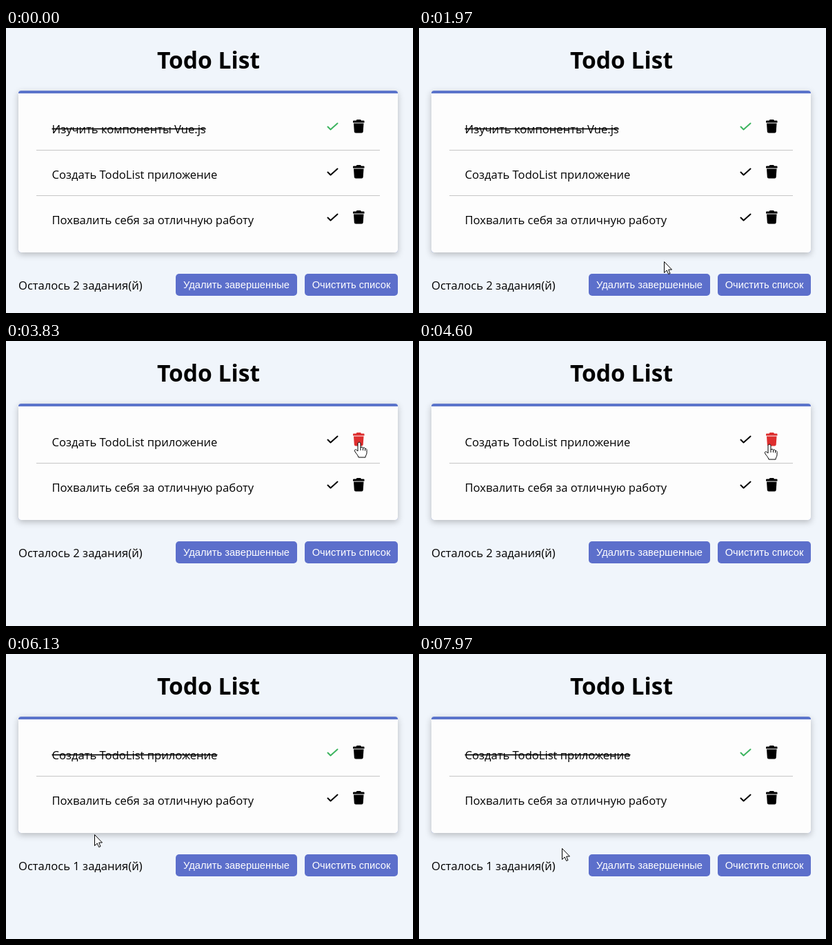
These frames come from a looping animation (590 px wide and 414 px high, 8000 ms). An HTML page:

```html
<!DOCTYPE html>
<html lang="ru">
<head>
<meta charset="utf-8">
<title>Todo List</title>
<style>
  html, body { margin: 0; width: 100%; height: 100%; overflow: hidden; background: #f0f5fb; }
  svg { display: block; }
  text { font: 16.6px "Open Sans", "Noto Sans", sans-serif; }
  .title { font-size: 33.6px; font-weight: 700; text-anchor: middle; }
  .button { font: 14.7px "Liberation Sans", Arial, sans-serif; fill: #fff; text-anchor: middle; }
  .check { fill: none; stroke-width: 2; stroke-linecap: round; stroke-linejoin: round; }
  .card { filter: drop-shadow(0 3px 5px rgba(0, 0, 0, .24)); }
  .pointer { fill: #fff; stroke: #000; stroke-linejoin: round; }
</style>
</head>
<body>
<svg width="590" height="414" viewBox="0 0 590 414">
  <text class="title" x="293.5" y="59">Todo List</text>
  <g class="card">
    <rect id="edge" x="18" y="91" width="550" rx="4" fill="#5b74cb"/>
    <path id="sheet" fill="#fdfdfd"/>
  </g>
  <g id="rows"></g>
  <g id="footer">
    <text id="left" x="18" y="380"></text>
    <g fill="#5c6fcb">
      <rect x="246" y="357" width="176" height="32" rx="5"/>
      <rect x="433" y="357" width="135" height="32" rx="5"/>
    </g>
    <text class="button" x="334" y="378">Удалить завершенные</text>
    <text class="button" x="500.5" y="378">Очистить список</text>
  </g>
  <g id="cursor" class="pointer">
    <path id="arrow" d="M.5 .5V16.5L4.2 13 6.7 18.5 9 17.5 6.7 12H11.5Z"/>
    <g id="hand">
      <path d="M-2 2C-2 -.5 2 -.5 2 2V8C3 6.5 5.5 7 5.5 8.5C7 7.5 8.5 8 8.5 9.5C10 9 11 10 11 11.5V15.5C11 18 9 19.5 9 22H-1C-1.5 19 -5 16 -6.5 13C-7.5 11 -5 10 -3.5 11.5L-2 13Z"/>
      <path fill="none" d="M2 8V12M5.5 8.5V12M8.5 9.5V12.5"/>
    </g>
  </g>
</svg>
<script>
const LOOP = 8000, DELETE_AT = 3830, FINISH_AT = 5400, STEP = 66;
const GREEN = '#3cb45f', RED = '#dd2e2e';
const tasks = ['Изучить компоненты Vue.js', 'Создать TodoList приложение', 'Похвалить себя за отличную работу'];

// Pointer moves: start, end, destination x, y
const moves = [
  [70, 300, 340, 335],
  [870, 1230, 143, 74],
  [1230, 1670, 90, 345],
  [1700, 2200, 560, 335],
  [2200, 2500, 545, 150],
  [2530, 2770, 512, 147],
  [4230, 4370, 508, 150],
  [4600, 5130, 478, 146],
  [5400, 6130, 128, 262],
  [6230, 6500, 20, 320],
  [6500, 7030, 550, 345],
  [7070, 7300, 20, 300],
  [7300, 7530, 545, 282],
  [7800, 7970, 207, 282]
];

const $ = id => document.getElementById(id);
const fade = (t, from, to) => Math.min(1, Math.max(0, (t - from) / (to - from)));
const ease = u => u * u * (3 - 2 * u);
const tint = (color, amount) => `color-mix(in srgb, ${color} ${amount * 100}%, #000)`;

$('rows').innerHTML = tasks.map((_, i) => `
  <g transform="translate(0 ${i * STEP})">
    ${i ? '<path d="M44 111.5H542" stroke="#c6c6c6"/>' : ''}
    <text x="66.5" y="152.5"></text>
    <path class="check" d="M466.5 143.5L470.5 147.5 480.5 138.5"/>
    <path class="trash" d="M503 135.5Q503 134.5 504 134.5H507.5L508.5 133H514L515 134.5H518.5Q519.5 134.5 519.5 135.5V137.5H503ZM504 138.5H518.5L517.7 150.5Q517.5 152.5 515.5 152.5H507Q505 152.5 504.8 150.5Z"/>
  </g>`).join('');
const rows = [...$('rows').children].map(g => ({
  g, label: g.querySelector('text'), check: g.querySelector('.check'), trash: g.querySelector('.trash')
}));

function pointerAt(t) {
  let x = 230, y = -20;
  for (const [start, end, toX, toY] of moves) {
    const u = ease(fade(t, start, end));
    x += (toX - x) * u;
    y += (toY - y) * u;
  }
  return [Math.round(x), Math.round(y)];
}

function draw(t) {
  const list = t < DELETE_AT ? tasks : tasks.slice(1);
  const firstDone = t < DELETE_AT || t >= FINISH_AT;
  const shift = (list.length - tasks.length) * STEP;

  rows.forEach(({ g, label, check, trash }, i) => {
    g.style.display = i < list.length ? '' : 'none';
    label.textContent = list[i] || '';
    label.style.textDecoration = i === 0 && firstDone ? 'line-through' : 'none';
    const green = i ? 0 : firstDone ? 1 : fade(t, 4900, 5130);
    const red = i ? 0 : fade(t, 2600, 2770) - fade(t, 4720, 4900);
    check.style.stroke = tint(GREEN, green);
    trash.style.fill = tint(RED, red);
  });

  const bottom = 326 + shift;
  $('edge').setAttribute('height', bottom - 91);
  $('sheet').setAttribute('d', `M18 95H568V${bottom - 4}Q568 ${bottom} 564 ${bottom}H22Q18 ${bottom} 18 ${bottom - 4}Z`);
  $('footer').setAttribute('transform', `translate(0 ${shift})`);
  $('left').textContent = `Осталось ${t < FINISH_AT ? 2 : 1} задания(й)`;

  const [x, y] = pointerAt(t);
  const onIcon = y > 132 && y < 160 && (Math.abs(x - 511) < 11 || Math.abs(x - 474) < 11);
  $('cursor').setAttribute('transform', `translate(${x} ${y})`);
  $('hand').style.display = onIcon ? '' : 'none';
  $('arrow').style.display = onIcon ? 'none' : '';
}

function frame() {
  draw(performance.now() % LOOP);
  requestAnimationFrame(frame);
}
frame();
</script>
</body>
</html>
```
